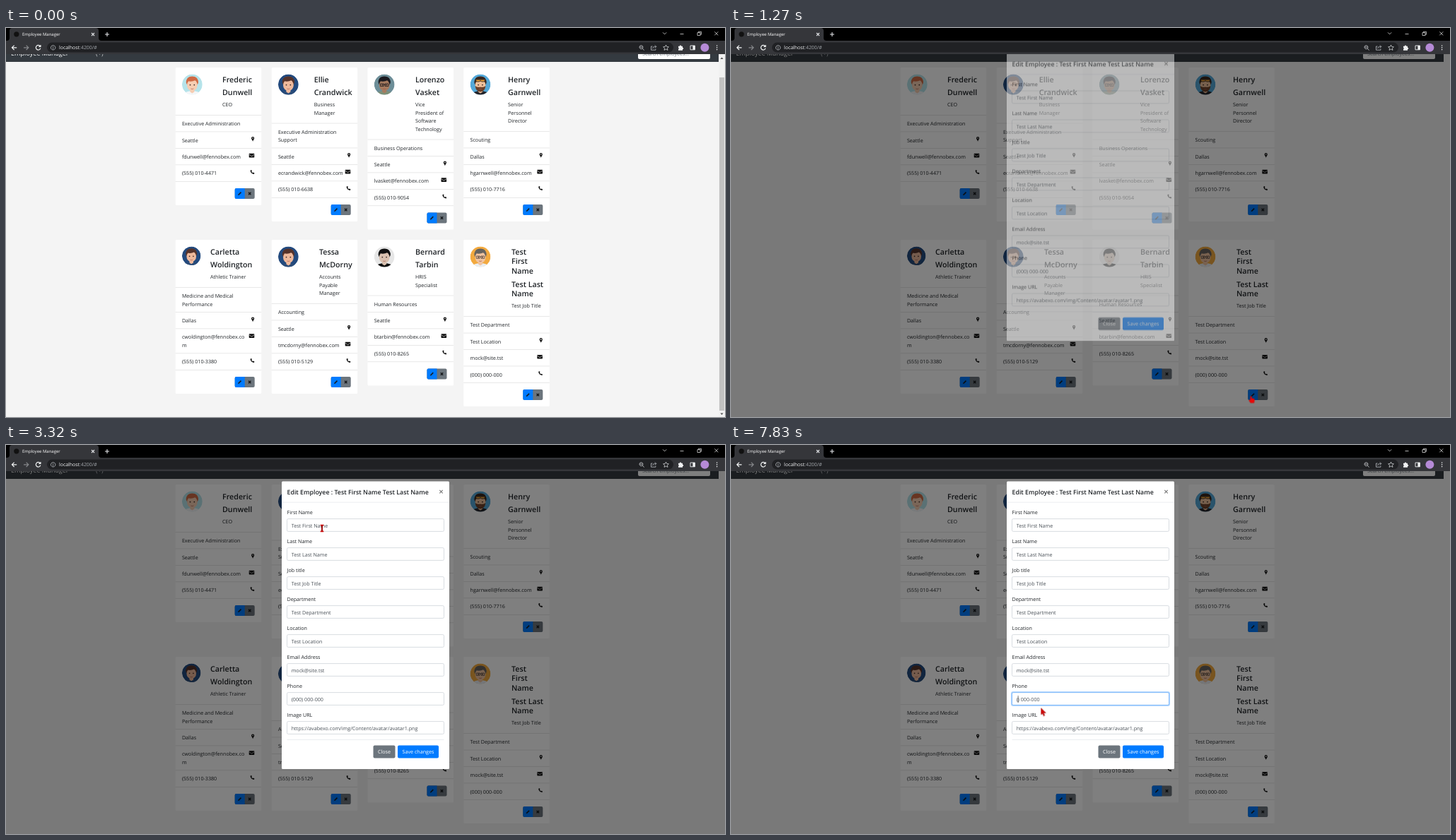
An HTML page that plays this animation: 1017x551 px, repeating every 8 s.

```html
<!DOCTYPE html>
<html lang="en">
<head>
<meta charset="utf-8">
<title>Employee Manager</title>
<style>
html, body { margin: 0; width: 100%; height: 100%; overflow: hidden; background: #f4f4f4; }
svg#stage { display: block; width: 100%; height: 100%; }
text { font-family: "Open Sans", "Noto Sans", sans-serif; text-rendering: geometricPrecision; white-space: pre; }
.bold { font-weight: 600; }

.anim { animation: 8s step-end -20ms infinite; }
#cursor { animation-name: move; }
#arrow { animation-name: arrow; }
#hand { animation-name: hand; }
#beam { animation-name: beam; }
#hover { animation-name: hover; }
#scrollbar { animation-name: scrollbar; }
#backdrop { animation-name: backdrop; }
#modal { animation-name: modal; }
#focus { animation-name: focus; }
#caret { animation-name: caret; }
#digits3 { animation-name: digits3; }
#digits2 { animation-name: digits2; }
#digits1 { animation-name: digits1; }
#digits0 { animation-name: digits0; }

@keyframes move {
  0%, 3.875% { transform: translate(769px, 520px); }
  4.875% { transform: translate(763px, 521px); }
  5.75% { transform: translate(755px, 521px); }
  6.625% { transform: translate(748px, 521px); }
  7.625% { transform: translate(742px, 522px); }
  8.5% { transform: translate(739px, 522px); }
  10.25% { transform: translate(736px, 522.5px); }
  15.875% { transform: translate(735.5px, 521.5px); }
  26.125% { transform: translate(740px, 517px); }
  27.25% { transform: translate(700px, 430px); }
  28.375% { transform: translate(612px, 262px); }
  29.5% { transform: translate(569px, 188px); }
  31.25% { transform: translate(566px, 186px); }
  32.125% { transform: translate(556px, 178px); }
  33.125% { transform: translate(536px, 163px); }
  34.125% { transform: translate(510px, 146px); }
  35.125% { transform: translate(482px, 130px); }
  36% { transform: translate(458px, 116px); }
  37% { transform: translate(449px, 113px); }
  41.5% { transform: translate(447px, 118px); }
  42.5% { transform: translate(444px, 138px); }
  43.5% { transform: translate(440px, 170px); }
  44.375% { transform: translate(435px, 214px); }
  45.375% { transform: translate(429px, 260px); }
  46.375% { transform: translate(423px, 304px); }
  47.25% { transform: translate(419px, 342px); }
  48.25% { transform: translate(416.7px, 359.5px); }
  61.375% { transform: translate(421px, 362px); }
  62.5% { transform: translate(419.5px, 361px); }
  64.375% { transform: translate(418px, 360px); }
  78.625% { transform: translate(428px, 366px); }
  79.5% { transform: translate(438.5px, 372.5px); }
}
@keyframes arrow {
  0% { opacity: 0; } 3.875% { opacity: 1; } 4.875% { opacity: 0; }
  26.125% { opacity: 1; } 37% { opacity: 0; }
  42.5% { opacity: 1; } 48.25% { opacity: 0; } 78.625% { opacity: 1; }
}
@keyframes hand { 0% { opacity: 0; } 4.875% { opacity: 1; } 26.125% { opacity: 0; } }
@keyframes beam {
  0% { opacity: 0; } 37% { opacity: 1; } 42.5% { opacity: 0; }
  48.25% { opacity: 1; } 78.625% { opacity: 0; }
}
@keyframes hover { 0% { opacity: 0; } 7.625% { opacity: 1; } 15.875% { opacity: 0; } }
@keyframes scrollbar { 0% { opacity: 1; } 13% { opacity: 0; } }
@keyframes backdrop { 0% { opacity: 0; } 14% { opacity: .26; } 15% { opacity: .5; } }
@keyframes modal {
  0% { opacity: 0; transform: translateY(-24px); }
  15.875% { opacity: .47; transform: translateY(-15.6px); }
  17% { opacity: 1; transform: translateY(-7.3px); }
  18% { opacity: 1; transform: translateY(-2px); }
  20% { opacity: 1; transform: none; }
}
@keyframes focus { 0% { opacity: 0; } 56.375% { opacity: .15; } 57.375% { opacity: .6; } 58.375% { opacity: 1; } }
@keyframes caret {
  0% { opacity: 0; transform: translateX(413.8px); }
  56.375% { opacity: 1; transform: translateX(413.8px); }
  62.5% { opacity: 0; transform: translateX(413.8px); }
  68.875% { opacity: 1; transform: translateX(413.8px); }
  75.25% { opacity: 0; transform: translateX(413.8px); }
  76.375% { opacity: 1; transform: translateX(418.2px); }
  83.875% { opacity: 0; transform: translateX(418.2px); }
  88.75% { opacity: 1; transform: translateX(414px); }
  90.75% { opacity: 1; transform: translateX(410.1px); }
  95.75% { opacity: 0; transform: translateX(410.1px); }
  97.875% { opacity: 1; transform: translateX(405.6px); }
}
@keyframes digits3 { 0% { opacity: 1; } 88.75% { opacity: 0; } }
@keyframes digits2 { 0% { opacity: 0; } 88.75% { opacity: 1; } 90.75% { opacity: 0; } }
@keyframes digits1 { 0% { opacity: 0; } 90.75% { opacity: 1; } 97.875% { opacity: 0; } }
@keyframes digits0 { 0% { opacity: 0; } 97.875% { opacity: 1; } }
</style>
</head>
<body>
<svg id="stage" viewBox="0 0 1017 551">
  <defs>
    <clipPath id="round"><circle r="14.4"/></clipPath>
    <g id="pin"><path d="M0 3.6C-.4 1.8-2.1.6-2.1-1.1a2.1 2.1 0 0 1 4.2 0C2.1.6.4 1.8 0 3.6Z" fill="#111"/><circle cy="-1.1" r=".8" fill="#fff"/></g>
    <g id="mail"><rect x="-3.8" y="-2.8" width="7.6" height="5.6" rx=".7" fill="#111"/><path d="M-3.8-1.5 0 1 3.8-1.5" fill="none" stroke="#fff" stroke-width=".6"/></g>
    <path id="phone" d="M-2.8-2.4C-2.4.8-.4 2.7 2.7 2.9L3 1.3 1.4.5.7 1.1C-.2.7-.8 0-1.1-.8L-.4-1.5-1.1-3Z" fill="#111"/>
    <path id="pencil" d="M-2.6 2.6-2.2 1 1.2-2.4 2.4-1.2-1 2.2Z"/>
    <path id="cross" d="M-1.7-1.7 1.7 1.7M1.7-1.7-1.7 1.7"/>
  </defs>
  <g id="page"></g>
  <rect id="backdrop" class="anim" y="37" width="1017" height="514"/>
  <g id="modal" class="anim"></g>
  <g id="browser"></g>
  <g id="cursor" class="anim">
    <path id="arrow" class="anim" d="M0 0V9.6L2.2 7.7 3.7 11.2 5.3 10.5 3.8 7.1H7Z" fill="#d20a0a" stroke="#7c0000" stroke-width=".4"/>
    <path id="hand" class="anim" d="M-.9.9A.9.9 0 0 1 .9.9V3L4 3.6Q5.2 4 5 5.8L4.3 9.6H-.7L-2.8 6.2Q-2.6 4.4-.9 5.2Z" fill="#e80808" stroke="#c00000" stroke-width=".3"/>
    <g id="beam" class="anim" fill="none"><path d="M-2.3-4.4H2.3M0-4.4V4.4M-2.3 4.4H2.3" stroke="#d20a0a" stroke-width="1.8"/><path d="M0-4V4" stroke="#4a0000" stroke-width=".8"/></g>
  </g>
</svg>
<script>
const BODY = 7.17, INK = '#212529', LINE = 11.5, ROW = 23.45;

// y is the optical middle of the capitals
const text = (x, y, str, { size = BODY, fill = INK, extra = '' } = {}) =>
  `<text x="${x}" y="${y + size * .36}" font-size="${size}" fill="${fill}" ${extra}>${str}</text>`;
const rect = (x, y, w, h, fill, extra = '') =>
  `<rect x="${x}" y="${y}" width="${w}" height="${h}" fill="${fill}" ${extra}/>`;
const icon = (id, x, y, extra = '') => `<use href="#${id}" x="${x}" y="${y}" ${extra}/>`;
const stroke = (d, color = '#fff', width = 1) =>
  `<path d="${d}" fill="none" stroke="${color}" stroke-width="${width}"/>`;
const put = (id, ...parts) => document.getElementById(id).innerHTML = parts.join('');

const looks = {
  red:    { bg: '#b5e3ea', hair: '#cf6a45', skin: '#f6cdb2', shirt: '#f4f6f8' },
  navy:   { bg: '#234a7e', hair: '#55332b', skin: '#eeb99c', shirt: '#2b4c78' },
  teal:   { bg: '#6d8e98', hair: '#1c1b20', skin: '#a67b5f', shirt: '#7d9078', glasses: '#15151a' },
  blue:   { bg: '#53a8d8', hair: '#3b281f', skin: '#f0c19c', shirt: '#25262c', beard: '#6a4029', shades: '#e59a35' },
  mono:   { bg: '#e6e6e6', hair: '#111', skin: '#d9c1b0', shirt: '#0d0d0d' },
  orange: { bg: '#f2a93f', hair: '#66635f', skin: '#f1c4a0', shirt: '#e9eef3', glasses: '#54483f' }
};
function avatar(x, y, look, scale) {
  const { bg, hair, skin, shirt, glasses, beard, shades } = looks[look];
  return `<g transform="translate(${x} ${y}) scale(${scale})" clip-path="url(#round)">
    <circle r="14.4" fill="${bg}"/><ellipse cy="14.5" rx="11.5" ry="5.5" fill="${shirt}"/>
    <ellipse cy="-3.5" rx="8.6" ry="7.6" fill="${hair}"/><path d="M-3 6H3V10.5L0 12.5-3 10.5Z" fill="${skin}"/>
    <ellipse cy="1" rx="7.4" ry="8.2" fill="${skin}"/>
    ${beard ? `<path d="M-7.4 2Q-4 4.5 0 3.6 4 4.5 7.4 2 6.4 10 0 10.4-6.4 10-7.4 2Z" fill="${beard}"/>` : ''}
    <path d="M-8-1Q-9.5-11.5 0-11.6 9.5-11.5 8-1 7-4 4.5-6-1-3-6.6-5Z" fill="${hair}"/>
    <g fill="#33241f"><circle cx="-2.9" cy=".6" r=".9"/><circle cx="2.9" cy=".6" r=".9"/></g>
    ${stroke('M-1.9 6Q0 7 1.9 6', '#a6574a', .7)}
    ${glasses ? stroke('M-5.7-1H-1V2.4H-5.7ZM1-1H5.7V2.4H1ZM-1 0H1', glasses, .8) : ''}
    ${shades ? `<path d="M-7-7H7L5.5-4H1.5L0-5.5-1.5-4H-5.5Z" fill="${shades}" stroke="#22201e" stroke-width=".8"/>` : ''}
  </g>`;
}

function card({ x, top, nameX, names, title, dept, city, email, phone, look, scale = 1 }) {
  let out = '', y = top + 16.8;
  for (const block of names) {
    block.forEach((s, i) => out += text(nameX, y + i * 13.7, s, { size: 10.7, extra: 'class="bold"' }));
    y += (block.length - 1) * 13.7 + 18.6;
  }
  y -= 1.3;
  title.forEach((s, i) => out += text(nameX, y + i * LINE, s));
  y += (title.length - 1) * LINE + 14.8;

  const items = [[dept], [[city], 'pin', 109.4], [email, 'mail', 107.8], [[phone], 'phone', 108.6]];
  for (const [lines, mark, dx] of items) {
    out += rect(x, y - .3, 121.5, .6, '#d9d9d9');
    lines.forEach((s, i) => out += text(x + 9.2, y + 12 + i * LINE, s));
    if (mark) out += icon(mark, x + dx, y + 10.2);
    y += ROW + (lines.length - 1) * LINE;
  }
  out += rect(x, y - .3, 121.5, .6, '#d9d9d9');
  const b = y + 17.2;
  out += rect(x + 84, b - 7.5, 28, 15, '#6c757d', 'rx="2"') +
    `<path d="M${x + 98} ${b - 7.5}v15h-12a2 2 0 0 1-2-2v-11a2 2 0 0 1 2-2Z" fill="#007bff"/>` +
    icon('pencil', x + 91, b, 'fill="#16202c"') +
    icon('cross', x + 105, b, 'stroke="#15181b" stroke-width="1.4"');
  return rect(x, top, 121.5, y + 33.7 - top, '#fff', 'rx="1.5"') +
    avatar(x + 9.3 + 14.4 * scale, top + 9.6 + 14.4 * scale, look, scale) + out;
}

const at = name => [name + '@fennobex.com'];
const people = [
  { x: 239.7, top: 56, nameX: 306, names: [['Frederic'], ['Dunwell']], title: ['CEO'], dept: ['Executive Administration'],
    city: 'Seattle', email: at('fdunwell'), phone: '(555) 010-4471', look: 'red' },
  { x: 375.7, top: 56, nameX: 435.7, names: [['Ellie'], ['Crandwick']], title: ['Business', 'Manager'],
    dept: ['Executive Administration', 'Support'], city: 'Seattle', email: at('ecrandwick'), phone: '(555) 010-6638', look: 'navy' },
  { x: 511.5, top: 56, nameX: 579, names: [['Lorenzo'], ['Vasket']], title: ['Vice', 'President of', 'Software', 'Technology'],
    dept: ['Business Operations'], city: 'Seattle', email: at('lvasket'), phone: '(555) 010-9054', look: 'teal' },
  { x: 647.3, top: 56, nameX: 710, names: [['Henry'], ['Garnwell']], title: ['Senior', 'Personnel', 'Director'],
    dept: ['Scouting'], city: 'Dallas', email: at('hgarnwell'), phone: '(555) 010-7716', look: 'blue' },
  { x: 239.7, top: 300, nameX: 289, names: [['Carletta'], ['Woldington']], title: ['Athletic Trainer'],
    dept: ['Medicine and Medical', 'Performance'], city: 'Dallas', email: ['cwoldington@fennobex.co', 'm'],
    phone: '(555) 010-3380', look: 'navy', scale: .92 },
  { x: 375.7, top: 300, nameX: 443, names: [['Tessa'], ['McDorny']], title: ['Accounts', 'Payable', 'Manager'],
    dept: ['Accounting'], city: 'Seattle', email: at('tmcdorny'), phone: '(555) 010-5129', look: 'navy' },
  { x: 511.5, top: 300, nameX: 579, names: [['Bernard'], ['Tarbin']], title: ['HRIS', 'Specialist'],
    dept: ['Human Resources'], city: 'Seattle', email: at('btarbin'), phone: '(555) 010-8265', look: 'mono' },
  { x: 647.3, top: 300, nameX: 715, names: [['Test', 'First', 'Name'], ['Test Last', 'Name']], title: ['Test Job Title'],
    dept: ['Test Department'], city: 'Test Location', email: ['mock@site.tst'], phone: '(000) 000-000', look: 'orange' }
];

put('page',
  rect(0, 37, 1017, 514, '#f4f4f4'),
  rect(0, 30, 1008, 18, '#343a40'),
  text(7, 35.5, 'Employee Manager', { size: 9.1, fill: '#fff' }),
  text(127, 35.5, '(+)', { size: 9.1, fill: '#c8cacc' }),
  rect(894, 28, 102, 16, '#fff', 'rx="2"'),
  text(900, 36, 'Search employees...', { fill: '#6c757d' }),
  ...people.map(card),
  `<g id="hover" class="anim">${rect(731.3, 512.2, 14, 15, '#0069d9', 'rx="2"')}${icon('pencil', 738.3, 519.8, 'fill="#fff"')}</g>`,
  `<g id="scrollbar" class="anim">${rect(1008, 37, 9, 514, '#f1f1f1')}${rect(1009, 70, 7, 472, '#c1c1c1')}
    <path d="M1010.4 44h4.2l-2.1-2.4ZM1010.4 545.5h4.2l-2.1 2.4Z" fill="#505050"/></g>`);

const fields = [
  ['First Name', 'Test First Name'], ['Last Name', 'Test Last Name'], ['Job title', 'Test Job Title'],
  ['Department', 'Test Department'], ['Location', 'Test Location'], ['Email Address', 'mock@site.tst'],
  ['Phone', null], ['Image URL', 'https://avabexo.com/img/Content/avatar/avatar1.png']
];
const GREY = { fill: '#495057' };
const phoneStates = [3, 2, 1, 0].map(n =>
  text(403.7, 360, `(${'0'.repeat(n)}) 000-000`, { ...GREY, extra: `id="digits${n}" class="anim"` }));
const button = (x, w, label, fill) => rect(x, 425.5, w, 18, fill, 'rx="2"') +
  text(x + w / 2, 434.6, label, { fill: '#fff', extra: 'text-anchor="middle"' });

put('modal',
  rect(390, 51.5, 237, 407.5, '#fff', 'rx="1.5"'),
  text(397.5, 66.6, 'Edit Employee : Test First Name Test Last Name', { size: 8.82, extra: 'class="bold"' }),
  stroke('M613.3 63.9l4.4 4.4m0-4.4l-4.4 4.4', '#777', 1.1),
  rect(390, 80.8, 237, .6, '#dee2e6'),
  ...fields.map(([label, value], i) => {
    const y = 41 * i;
    return text(397.5, 95.2 + y, label) +
      rect(397.5, 104.6 + y, 222, 17.8, '#fff', 'rx="1.8" stroke="#ced4da" stroke-width=".8"') +
      (value ? text(403.7, 114 + y, value, GREY) : '');
  }),
  `<g id="focus" class="anim">${rect(396.7, 349.8, 223.6, 19.4, 'none', 'rx="2.4" stroke="#007bff" stroke-opacity=".3" stroke-width="1.6"')}
    ${rect(397.5, 350.6, 222, 17.8, 'none', 'rx="1.8" stroke="#80bdff" stroke-width=".9"')}</g>`,
  ...phoneStates,
  `<rect id="caret" class="anim" y="355" width=".6" height="10" fill="#222"/>`,
  rect(397.5, 417.2, 222, .6, '#dee2e6'),
  button(519.5, 31, 'Close', '#6c757d'),
  button(554, 58, 'Save changes', '#007bff'));

put('browser',
  rect(0, 0, 1017, 18, '#000'),
  '<path d="M1 18Q5 18 5 14V4Q5 0 9 0H127Q131 0 131 4V14Q131 18 135 18Z" fill="#35363a"/>',
  rect(0, 18, 1017, 19, '#35363a'),
  '<circle cx="14.8" cy="8.8" r="3.6" fill="#111"/>',
  text(23, 9, 'Employee Manager', { size: 6, fill: '#fff' }),
  stroke('M121 7l4 4m0-4l-4 4M143 6v6M140 9h6', '#e8eaed', 1.1),
  stroke('M929 6.3l2.6 2.6 2.6-2.6M953.5 8.5h5M978 6.6h4v4h-4ZM979.4 6.4V5.2h4v4h-1.2M1002.3 5.3l5 5m0-5l-5 5', '#dcdcdc', .8),
  rect(58, 20.6, 886, 14, '#202124', 'rx="7"'),
  stroke('M15.2 27.8H8.5M11.6 24.6l-3.2 3.2 3.2 3.2M48.3 25.8a3.3 3.3 0 1 0 .5 2.8M48.9 24v2.4h-2.6', '#f1f3f4', 1.2),
  stroke('M25 27.8h6.7M28.6 24.6l3.2 3.2-3.2 3.2', '#85878a', 1.2),
  stroke('M66.6 24.6a3.2 3.2 0 1 0 .1 0M66.6 27.4v2.2M66.6 26v.8', '#bdc1c6', .8),
  text(75, 27.8, 'localhost<tspan fill="#a5a9ae">:4200/#</tspan>', { size: 6.95, fill: '#f1f3f4' }),
  stroke('M898.4 24.8a2.4 2.4 0 1 0 .1 0M900.2 29l2.4 2.4M897.2 27.2h2.5', '#d0d2d5', .9),
  stroke('M914.5 26h-2v5.2h6.4v-1.8M914.6 29.2q.3-2.8 3-2.8h2M917.8 24.4l2 2-2 2', '#bdc1c6', .8),
  stroke('M933.5 24l1.2 2.5 2.7.3-2 1.9.6 2.7-2.5-1.4-2.5 1.4.6-2.7-2-1.9 2.7-.3Z', '#d0d2d5', .8),
  '<path d="M951 25.8h1.8a1.2 1.2 0 0 1 2.4 0h1.8v1.9a1.2 1.2 0 0 1 0 2.4v1.7h-6v-1.9a1.2 1.2 0 0 0 0-2.2Z" fill="#f1f3f4"/>',
  stroke('M968 25h6.4v5.8H968Z', '#f1f3f4', .9), rect(971.4, 25, 3, 5.8, '#f1f3f4'),
  '<circle cx="988.4" cy="27.8" r="6" fill="#b58ad6"/>',
  ...[25, 27.8, 30.6].map(y => `<circle cx="1005.6" cy="${y}" r=".8" fill="#f1f3f4"/>`));
</script>
</body>
</html>
```
